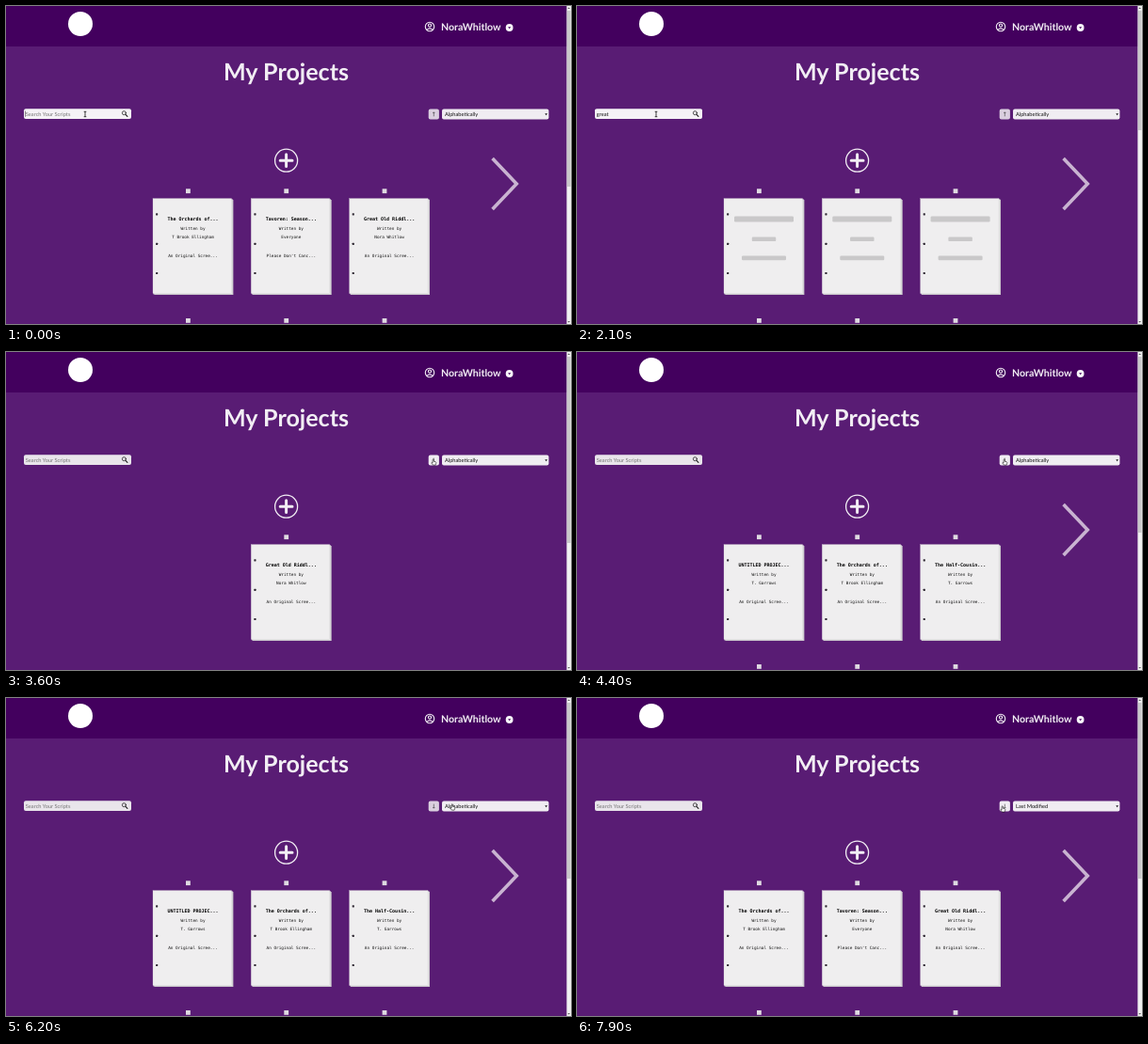
Animation of 600x338 px, one loop 8 s. Source, as an HTML page:

```html
<!DOCTYPE html>
<html lang="en">
<head>
<meta charset="utf-8">
<title>My Projects</title>
<style>
  html, body { margin: 0; width: 100%; height: 100%; overflow: hidden; background: #591c74; }
  svg { display: block; width: 100%; height: 100%; }
  text { font-family: Lato, sans-serif; text-rendering: geometricPrecision; white-space: pre; }
  .field { font-size: 5.7px; fill: #111; }
  .hint { fill: #757575; }
  .mono { font-family: "DejaVu Sans Mono", monospace; font-size: 4.375px; text-anchor: middle; fill: #111; }
  .mono.head { font-size: 5px; font-weight: 700; fill: #000; }
  .line { fill: none; stroke: #f2eef4; stroke-linecap: round; }
  .bar { fill: #c9c8c9; }
</style>
</head>
<body>
<svg viewBox="0 0 600 338" preserveAspectRatio="none">
  <rect width="600" height="338" fill="#591c74"/>
  <rect width="600" height="43" fill="#43005e"/>

  <!-- header -->
  <circle cx="79" cy="19" r="13" fill="#fff"/>
  <g class="line" stroke-width="1.1">
    <circle cx="450" cy="22" r="4.7"/>
    <circle cx="450" cy="20.6" r="1.6"/>
    <path d="M447 25.3Q450 22.4 453 25.3"/>
  </g>
  <text x="462" y="25.8" font-size="10.6" font-weight="700" fill="#f2eef4">NoraWhitlow</text>
  <circle cx="534.6" cy="23" r="3.9" fill="#f8f5fa"/>
  <path d="M533.1 22.3h3l-1.5 1.9z" fill="#43005e"/>
  <text x="297.5" y="79.3" font-size="25.1" font-weight="700" fill="#f2eef4" text-anchor="middle">My Projects</text>

  <!-- search -->
  <rect id="box" x="19" y="109.2" width="114" height="10.9" rx="2"/>
  <text id="query" class="field" x="20.8" y="116.7"></text>
  <rect id="caret" y="111.6" width=".5" height="6.2" fill="#222"/>
  <g fill="none" stroke="#222" stroke-linecap="round">
    <circle cx="125.4" cy="113.7" r="2" stroke-width=".8"/>
    <path d="M127 115.4l1.9 1.9" stroke-width="1.2"/>
  </g>

  <!-- sorting -->
  <rect id="sort" x="448.7" y="109.4" width="11.2" height="11.2" rx="2"/>
  <path id="arrow" d="M0 2.3V-2.1M-1.1-1L0-2.2L1.1-1" fill="none" stroke="#333" stroke-width=".6"/>
  <rect id="select" x="463" y="109.4" width="113.4" height="11.2" rx="2"/>
  <text id="value" class="field" x="466" y="116.8"></text>
  <path d="M572.3 114.2h2.6l-1.3 2z" fill="#111"/>

  <!-- projects -->
  <g class="line">
    <circle cx="297.6" cy="164.2" r="12" stroke-width="1.3"/>
    <path d="M291.2 164.2h12.8M297.6 157.8v12.8" stroke-width="3"/>
  </g>
  <path id="next" d="M516.6 162L542.2 189L516.6 216" fill="none" stroke="#c9b3d1" stroke-width="3.6"/>
  <g id="lists"></g>

  <g id="menu">
    <rect x="463" y="120.8" width="113.2" height="22" fill="#f4f3f4"/>
    <path d="M463 121H576.2" stroke="#555" stroke-width=".6" stroke-dasharray="1.2 1"/>
    <rect id="pick" x="463.4" width="112.4" height="7.2" fill="#3b6ef0"/>
    <g id="options"></g>
  </g>

  <!-- scrollbar -->
  <rect x="595.4" width="4.6" height="338" fill="#f0f0f0"/>
  <rect id="thumb" x="595.9" y="5" width="3.6" fill="#c8c7c9"/>
  <path d="M596.4 3.1h2.6l-1.3-1.7zM596.4 334.9h2.6l-1.3 1.7z" fill="#555"/>

  <g id="pointer">
    <path id="beam" d="M-1.3-2.7H1.3M0-2.7V2.7M-1.3 2.7H1.3" fill="none" stroke="#111" stroke-width=".8"/>
    <path id="hand" d="M-.9-2.8q.7-.7 1.2 0V-.8L2.2-.3Q3 0 2.7 1.2L2.1 3.1H-.6L-2.2.8q.2-.8 1.3 0z" fill="#fff" stroke="#111" stroke-width=".6"/>
    <path id="tip" d="M-1.5-2.8V2.2L-.3 1.2L.5 2.9L1.3 2.5L.6 1H2z" fill="#111" stroke="#fff" stroke-width=".4"/>
  </g>
</svg>
<script>
const $ = id => document.getElementById(id);
const LOOP = 8000, STEP = 100;
const OPTIONS = ["Alphabetically", "Last Modified", "Script Length"];

const screenplay = "An Original Scree...";
const scripts = {
  orchards: ["The Orchards of...", "T Brook Ellingham", screenplay],
  tavoren: ["Tavoren: Season...", "Everyone", "Please Don't Canc..."],
  great: ["Great Old Riddl...", "Nora Whitlow", screenplay],
  untitled: ["UNTITLED PROJEC...", "T. Garrows", screenplay],
  cousin: ["The Half-Cousin...", "T. Garrows", screenplay]
};
const lists = {
  up: ["orchards", "tavoren", "great"],
  one: [null, "great"],
  down: ["untitled", "orchards", "cousin"],
  wait: ["", "", ""]
};
const thumbEnd = { up: 192, down: 192, one: 203, wait: 132 };

const rect = (x, y, w, h, rest) => `<rect x="${x}" y="${y}" width="${w}" height="${h}" ${rest}/>`;
const mono = (y, text, cls = "") => `<text class="mono ${cls}" x="42.5" y="${y}">${text}</text>`;
const bar = (y, w, h) => rect(42.5 - w / 2, y, w, h, 'rx="1.2" class="bar"');
const pin = y => rect(35, y, 4.8, 4.8, 'fill="#dfdbe1"');

function card(name, i, single) {
  if (name === null) return "";
  const s = scripts[name];
  const body = s
    ? mono(227.8, s[0], "head") + mono(237.5, "Written by") + mono(246.5, s[1]) + mono(266.9, s[2])
    : bar(223.5, 63, 6) + bar(245.5, 25.5, 4.6) + bar(265.6, 47, 4.6);
  return `<g transform="translate(${156 + i * 104.3} 0)">` + pin(194.3) +
    rect(1.4, 206, 84, 101, 'fill="#c8c5ca"') +
    rect(.7, 205.3, 83.8, 100.8, 'fill="#e4e3e5" stroke="#c3c0c5" stroke-width=".3"') +
    rect(0, 204.6, 83.4, 100.8, 'fill="#efeeef" stroke="#cfccd0" stroke-width=".3"') +
    [220.3, 251.8, 283].map(y => rect(3.1, y, 2.1, 2.1, 'rx=".4" fill="#2c2630"')).join("") +
    body + (single ? "" : pin(332)) + "</g>";
}

$("lists").innerHTML = Object.keys(lists).map(key =>
  `<g id="${key}">` + lists[key].map((n, i) => card(n, i, key === "one")).join("") + "</g>").join("");
$("options").innerHTML = OPTIONS.map((o, i) =>
  `<text class="field" x="465" y="${126.5 + i * 7.2}">${o}</text>`).join("");

// Each track holds [start time, value] pairs.
const tracks = {
  list: [[0, "up"], [1900, "wait"], [2200, "one"], [3700, "wait"], [4100, "down"], [4600, "wait"],
    [4900, "up"], [5400, "wait"], [5800, "down"], [7100, "wait"], [7400, "up"]],
  query: [[0, ""], [300, "g"], [500, "gr"], [700, "gre"], [900, "grea"], [1000, "great"], [2200, ""]],
  caret: [[0, 1], [1600, 0], [2200, 1], [2800, 0], [3300, 1], [3500, 0]],
  rising: [[0, 1], [3600, 0], [4600, 1], [5400, 0]],
  option: [[0, 0], [6800, 1]],
  menu: [[0, 0], [6400, 1], [7100, 0]]
};
const at = (track, t) => tracks[track].filter(k => k[0] <= t).pop()[1];

// Pointer stops: time, x, y
const stops = [[0, 84, 115], [2700, 84, 115], [2900, 200, 101], [3100, 380, 98], [3300, 470, 112],
  [3500, 454, 117], [5900, 454, 117], [6200, 474, 116], [7300, 474, 116], [7600, 492, 117],
  [7900, 452, 118], [8000, 452, 118]];

function pointer(t) {
  const i = stops.findIndex(s => s[0] > t);
  const [a, b] = [stops[i - 1], stops[i]];
  const p = (t - a[0]) / (b[0] - a[0]);
  return [a[1] + (b[1] - a[1]) * p, a[2] + (b[2] - a[2]) * p];
}

const show = (id, on) => $(id).setAttribute("display", on ? "inline" : "none");
const set = (id, name, value) => $(id).setAttribute(name, value);

function draw(t) {
  const list = at("list", t), query = at("query", t), option = at("option", t), open = at("menu", t);
  const [x, y] = pointer(t);

  for (const key in lists) show(key, key === list);
  show("next", list !== "one");
  set("thumb", "height", thumbEnd[list] - 5);

  $("query").textContent = query || "Search Your Scripts";
  $("query").classList.toggle("hint", !query);
  set("box", "fill", t < 3500 ? "#f5f3f6" : "#e9e5eb");
  show("caret", at("caret", t));
  set("caret", "x", query ? 20.9 + $("query").getComputedTextLength() : 20.4);

  const hover = x > 448 && x < 460.5 && y > 109;
  const onSelect = x > 463 && y > 109;
  set("sort", "fill", hover ? "#f0edf2" : "#dacfdf");
  set("arrow", "transform", `translate(454.3 115) scale(1 ${at("rising", t) ? 1 : -1})`);
  set("select", "fill", open ? "#e6e2e8" : "#f0edf2");
  $("value").textContent = OPTIONS[option];

  show("menu", open);
  set("pick", "y", 121.2 + option * 7.2);
  [...$("options").children].forEach((o, i) => o.style.fill = i === option ? "#fff" : "#111");

  const inSearch = x < 133 && y > 109;
  set("pointer", "transform", `translate(${x} ${y})`);
  show("beam", inSearch);
  show("hand", hover || onSelect);
  show("tip", !inSearch && !hover && !onSelect);
}

const start = performance.now();
function tick() {
  const t = (performance.now() - start) % LOOP;
  draw(Math.floor(t / STEP) * STEP);
  requestAnimationFrame(tick);
}
tick();
</script>
</body>
</html>
```
